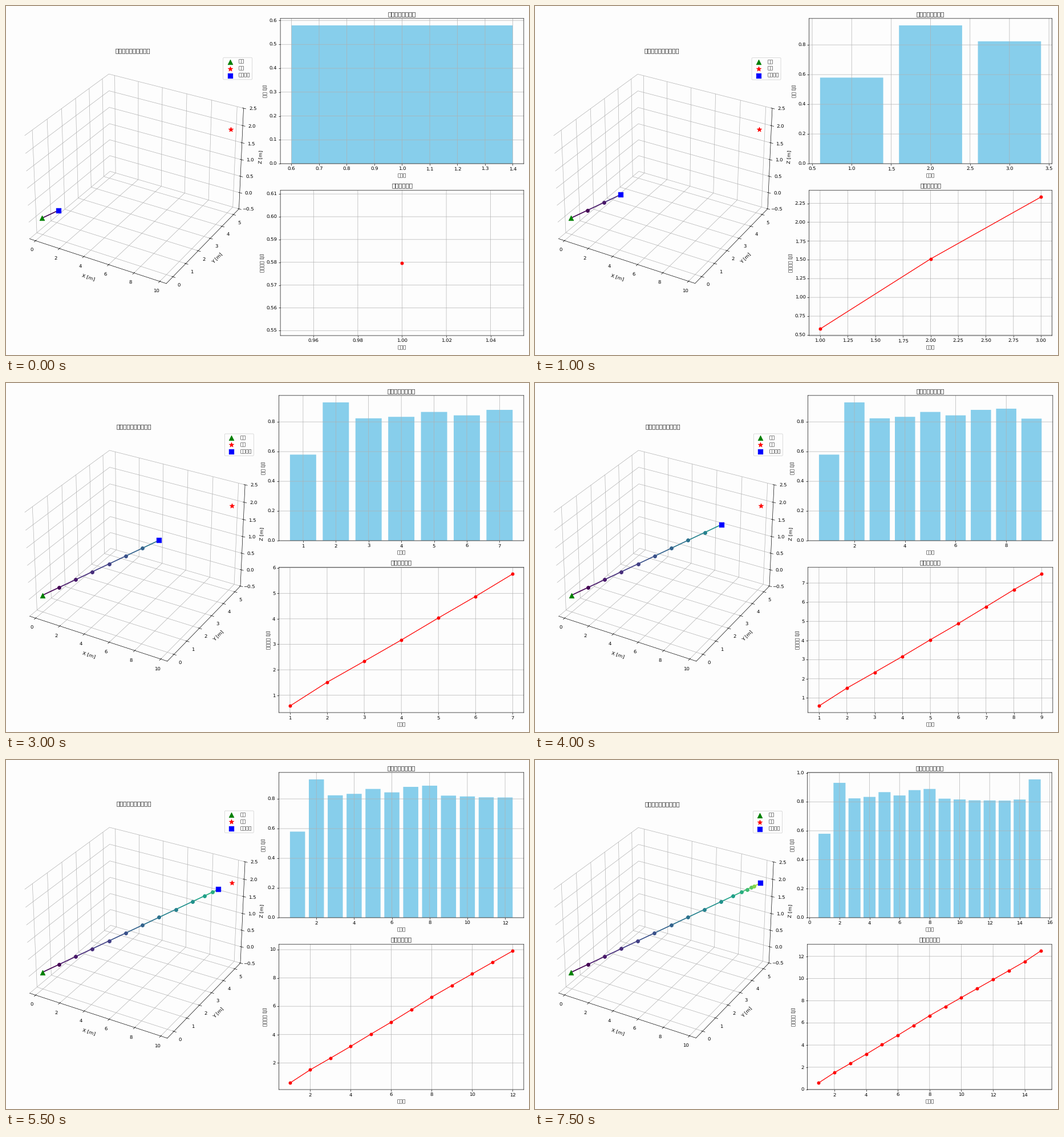
A matplotlib script for the animation above (10 s loop, 917 by 611 pixels).

```python
import numpy as np
import matplotlib.pyplot as plt
from matplotlib.animation import FuncAnimation

W, H, DPI = 917, 611, 61.13
BG = "#fdfdfd"

# Unsnapped paths and unhinted text keep their soft sub-pixel positions.
plt.rcParams.update({
    "font.family": "DejaVu Sans",
    "figure.facecolor": BG,
    "axes.facecolor": BG,
    "path.snap": False,
    "text.hinting": "none",
})
# Glyphs missing from DejaVu Sans must show as its plain hollow boxes.
if "font.enable_last_resort" in plt.rcParams:
    plt.rcParams["font.enable_last_resort"] = False

START, GOAL = np.zeros(3), np.array([10.0, 5.0, 2.0])
ENERGY = np.array([0.5797, 0.9313, 0.824, 0.834, 0.867, 0.844, 0.881, 0.889,
                   0.822, 0.8165, 0.8105, 0.8095, 0.8085, 0.816, 0.955])
TOTAL = np.cumsum(ENERGY)


def plan_path(gain=0.3, max_step=1.0, reach=0.5):
    """Walk toward the goal, slowing down near it, then snap onto it."""
    path = [START]
    while True:
        gap = GOAL - path[-1]
        dist = np.linalg.norm(gap)
        if dist < reach:
            return np.array(path + [GOAL])
        path.append(path[-1] + gap / dist * min(max_step, gain * dist))


PATH = plan_path()
STEPS = len(PATH) - 1
COLORS = plt.cm.viridis(np.arange(STEPS) / len(PATH))

fig = plt.figure(figsize=((W + 0.01) / DPI, (H + 0.01) / DPI), dpi=DPI)
space = fig.add_subplot(121, projection="3d")
bars = fig.add_subplot(222)
curve = fig.add_subplot(224)


def draw_space(n):
    space.clear()
    for i in range(n):
        space.plot(*PATH[i:i + 2].T, color=COLORS[i], lw=2)
    for i in range(n):
        space.plot(*PATH[i + 1:i + 2].T, "o", color=COLORS[i], ms=7)
    for point, color, marker, label in (
            (START, "green", "^", "起点"),
            (GOAL, "red", "*", "目标"),
            (PATH[n], "blue", "s", "当前位置")):
        space.scatter(*point, color=color, marker=marker, s=100, label=label)
    space.set(xlim=(-0.5, 10.5), ylim=(-0.5, 5.5), zlim=(-0.5, 2.5),
              xlabel="X [m]", ylabel="Y [m]", zlabel="Z [m]",
              title="三维路径规划实时动画")
    for axis in (space.xaxis, space.yaxis, space.zaxis):
        axis.set_pane_color(BG)
    space.legend(loc="upper right")


def draw_charts(n):
    steps = np.arange(1, n + 1)
    bars.clear()
    bars.bar(steps, ENERGY[:n], color="skyblue")
    bars.set(title="各步能量消耗情况", xlabel="步骤数", ylabel="能量 [J]")
    curve.clear()
    curve.plot(steps, TOTAL[:n], "ro-")
    curve.set(title="累计能量消耗", xlabel="步骤数", ylabel="累计能量 [J]")
    for ax in (bars, curve):
        ax.grid(True)


def fit_layout():
    # The 3D labels may overhang, so they are left out of the fit.
    space.set_axis_off()
    for _ in range(2):
        fig.tight_layout()
    space.set_axis_on()


def update(frame):
    n = min(frame + 1, STEPS)
    draw_space(n)
    draw_charts(n)
    fit_layout()
    return []


anim = FuncAnimation(fig, update, frames=20, interval=500,
                     repeat=True, repeat_delay=0, blit=False)
plt.show()
```
